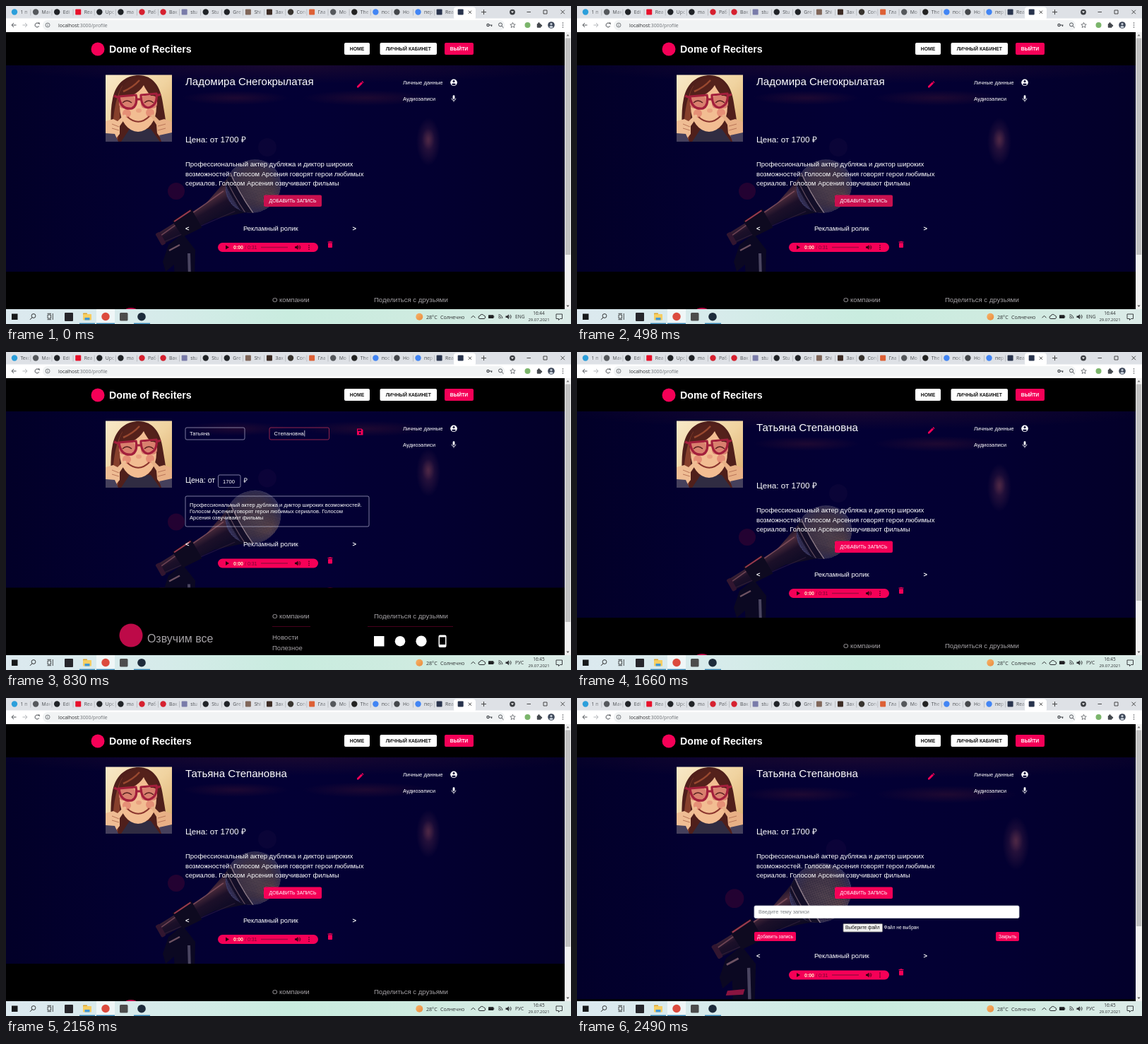
Recreate the animation shown at these times as an HTML page with a canvas. Size 800 by 450 pixels, loop 3.32 s.

```html
<!DOCTYPE html>
<html lang="ru">
<head>
<meta charset="utf-8">
<style>
  html, body { margin: 0; width: 800px; height: 450px; overflow: hidden; background: #000; }
  canvas { display: block; }
</style>
</head>
<body>
<canvas id="stage" width="800" height="450"></canvas>
<script>
const ctx = document.getElementById('stage').getContext('2d');
const SANS = '"Liberation Sans", Arial, sans-serif';
const UI = '"Open Sans", "Noto Sans", sans-serif';
const PINK = '#f50057', WHITE = '#fff', GREY = '#a5a2a6', DARK = '#2b2d30';
const STEP = 830;

// shift: vertical offset of everything below the description
const scenes = [
  { name: 'Ладомира Снегокрылатая', tab: '1 п', lang: 'ENG', time: '16:44', shift: 0, thumb: 352, mid: 230, zoom: 1, add: '#c9104f' },
  { edit: true, tab: 'Текс', lang: 'РУС', time: '16:45', shift: -42.5, thumb: 382, mid: 208.5, zoom: 1 },
  { name: 'Татьяна Степановна', tab: '1 п', lang: 'РУС', time: '16:45', shift: 0, thumb: 352, mid: 230, zoom: 1, add: PINK },
  { name: 'Татьяна Степановна', tab: '1 п', lang: 'РУС', time: '16:45', shift: 50.5, thumb: 323, mid: 248, zoom: 1.116, add: PINK, form: true }
];

function box(x, y, w, h, fill, r = 0, stroke) {
  ctx.beginPath();
  ctx.roundRect(x, y, w, h, r);
  if (fill) { ctx.fillStyle = fill; ctx.fill(); }
  if (stroke) { ctx.strokeStyle = stroke; ctx.lineWidth = 0.8; ctx.stroke(); }
}
function disc(x, y, r, fill, ry = r) {
  ctx.beginPath();
  ctx.ellipse(x, y, r, ry, 0, 0, 7);
  ctx.fillStyle = fill;
  ctx.fill();
}
function ring(x, y, r, color, width = 1, from = 0, to = Math.PI * 2) {
  ctx.beginPath();
  ctx.arc(x, y, r, from, to);
  ctx.strokeStyle = color;
  ctx.lineWidth = width;
  ctx.stroke();
}
function line(points, color, width = 1) {
  ctx.strokeStyle = color;
  ctx.lineWidth = width;
  ctx.stroke(new Path2D('M' + points));
}
function shape(d, fill) {
  ctx.fillStyle = fill;
  ctx.fill(new Path2D(d));
}
function text(s, x, y, size, color = WHITE, { bold, align = 'left', font = SANS } = {}) {
  ctx.font = `${bold ? 'bold ' : ''}${size}px ${font}`;
  ctx.textAlign = align;
  ctx.fillStyle = color;
  ctx.fillText(s, x, y);
}
function button(label, x, y, w, h, fill, color, size, bold) {
  box(x, y, w, h, fill, 2);
  text(label, x + w / 2, y + h / 2 + size * 0.36, size, color, { bold, align: 'center' });
}
function clipped(x, y, w, h, draw) {
  ctx.save();
  ctx.beginPath();
  ctx.rect(x, y, w, h);
  ctx.clip();
  draw();
  ctx.restore();
}
function glow(x, y, rx, ry, rgb, alpha) {
  ctx.save();
  ctx.translate(x, y);
  ctx.scale(rx, ry);
  const g = ctx.createRadialGradient(0, 0, 0, 0, 0, 1);
  g.addColorStop(0, `rgba(${rgb},${alpha})`);
  g.addColorStop(1, `rgba(${rgb},0)`);
  ctx.fillStyle = g;
  ctx.fillRect(-1, -1, 2, 2);
  ctx.restore();
}
function blend(x0, y0, x1, y1, ...colors) {
  const g = ctx.createLinearGradient(x0, y0, x1, y1);
  colors.forEach((c, i) => g.addColorStop(i / (colors.length - 1), c));
  return g;
}

function drawMicrophone() {
  shape('M230 338L250 322L268 345L266 420L240 420L238 366L226 376L222 362Z', '#0b0822');
  line('259 350L261 420', '#4a4560', 4);
  line('231 346L246 338', '#6d5262', 2.5);
  shape('M232 379L254 377L252 384L230 385Z', '#8a1440');

  ctx.save();
  ctx.translate(350, 255);
  ctx.rotate(Math.PI * 0.835);
  shape('M20 -30L36 -24L70 -13L152 -8L154 9L70 12L36 24L20 31Z',
    blend(0, -26, 0, 28, '#0d0a22', '#120c26', '#1c1029', '#4b2b3b', '#160e27'));
  line('40 15L150 4', 'rgba(165,105,115,.55)', 1.6);
  line('40 -18L148 -6', 'rgba(95,60,90,.35)', 1);
  shape('M92 -15L122 -13L124 14L92 16Z', '#0e0a20');
  line('94 14L122 12', '#9a3a4e', 2);
  box(147, -9, 7, 19, '#321630', 2);

  ctx.beginPath();
  ctx.ellipse(0, 0, 40, 37, 0, 0, 7);
  ctx.clip();
  const mesh = ctx.createRadialGradient(-4, -6, 4, 0, 0, 41);
  mesh.addColorStop(0, '#6f5d62');
  mesh.addColorStop(0.55, '#5a4a58');
  mesh.addColorStop(0.88, '#454068');
  mesh.addColorStop(1, '#5b5b92');
  ctx.fillStyle = mesh;
  ctx.fillRect(-42, -40, 84, 80);
  glow(-14, -26, 26, 18, '165,120,95', 0.5);
  for (let k = -80; k <= 80; k += 3) {
    line(`${k - 40} -40L${k + 40} 40`, 'rgba(14,10,38,.5)', 0.9);
    line(`${k + 40} -40L${k - 40} 40`, 'rgba(14,10,38,.5)', 0.9);
  }
  line('25 -40Q30 0 25 40', '#130e28', 12);
  line('18 -40Q23 0 18 40', '#8d7c88', 1.2);
  line('27 -40Q32 0 27 40', '#5f4a5c', 1.2);
  ctx.restore();
}

function drawBackdrop({ mid, zoom, shift }) {
  clipped(0, 84, 792, 292 + shift, () => {
    ctx.translate(396, mid);
    ctx.scale(zoom, zoom);
    ctx.translate(-396, -230);
    ctx.fillStyle = blend(0, 0, 792, 0, '#020028', '#030031', '#030035', '#030031', '#030029');
    ctx.fillRect(0, 40, 792, 400);
    glow(400, 84, 420, 26, '50,18,42', 0.45);
    glow(325, 130, 75, 10, '70,22,48', 0.4);
    glow(510, 130, 90, 11, '70,22,48', 0.4);
    glow(598, 192, 17, 34, '95,45,75', 0.55);
    glow(598, 188, 9, 15, '120,65,80', 0.4);
    disc(370, 200, 13, 'rgba(60,25,80,.14)');
    disc(241, 262, 12, 'rgba(120,8,50,.28)');
    drawMicrophone();
  });
}

function drawPortrait() {
  clipped(141, 97.5, 94, 94.5, () => {
    ctx.fillStyle = blend(141, 97, 235, 192, '#f8e9c8', '#f0d3a0', '#d8a766');
    ctx.fillRect(141, 97, 94, 95);
    shape('M145 192C151 174 146 154 151 131C156 107 172 98 188 98C208 98 219 114 222 137C225 157 230 174 224 192Z', '#4f1f1b');
    shape('M151 184C151 160 154 130 165 112C159 140 163 168 158 190Z', '#87402c');
    shape('M163 192L175 174H205L218 192Z', '#302c42');
    disc(187, 143, 26, '#f2bd92', 35);
    shape('M159 135C159 109 178 100 193 102C210 104 216 120 216 136C207 131 199 121 195 112C188 124 173 130 159 135Z', '#54211b');
    line('166 121Q180 115 189 105', '#98482f', 2.5);
    disc(171, 152, 6, '#e58f76');
    disc(204, 151, 6, '#e58f76');
    ctx.save();
    ctx.lineJoin = 'round';
    for (const x of [160, 191]) {
      box(x, 127, 23, 18, '#d9806e', 6);
      line(`${x + 5} 137Q${x + 11} 131 ${x + 18} 137`, '#5a2320', 1.6);
    }
    line('160 128L184 126Q187 141 178 145Q162 147 160 128ZM191 126L213 124Q215 141 201 144Q191 142 191 126ZM184 132L191 132M153 127L160 130M213 127L219 125', '#a31f3c', 3.2);
    ctx.restore();
    disc(188, 148, 4, '#e9a180', 3);
    line('172 157Q188 171 203 156', '#8a342d', 2);
    // hands with fingers pressed to the cheeks
    shape('M141 163L152 160L158 163L167 154Q171 153 170 157L161 170L161 181L152 192H141Z', '#efbd94');
    shape('M235 164L224 160L217 162L209 154Q204 153 206 157L213 168L214 180L223 192H235Z', '#e8b086');
    line('150 167L160 171M150 173L160 176M226 167L215 170M226 173L215 176', '#b97558', 1);
    shape('M141 180L154 181L159 192H141ZM217 183L235 179V192H220Z', '#45405c');
  });
}

function drawSpeaker(x, y, color) {
  shape(`M${x - 4} ${y - 1.3}h2l2.4 -2.2v7l-2.4 -2.2h-2Z`, color);
  ring(x, y, 2, color, 0.8, -1, 1);
  ring(x, y, 3.8, color, 0.8, -0.9, 0.9);
}

function drawPlayer(shift) {
  ctx.save();
  ctx.translate(0, shift);
  text('<', 254, 317.5, 9.4, WHITE, { bold: true });
  text('Рекламный ролик', 336, 317.5, 9.43);
  text('>', 490.5, 317.5, 9.4, WHITE, { bold: true });
  box(300, 335, 142, 13, PINK, 6.5);
  shape('M311 338.5L316 341.5L311 344.5Z', '#30000f');
  text('0:00', 322, 344, 7, '#fff3c8', { bold: true });
  text('/ 0:31', 338, 344, 7, '#780530');
  line('361 341.5L399 341.5', '#a50842', 1.6);
  drawSpeaker(413, 341.5, '#30000f');
  for (const y of [338.8, 341.5, 344.2]) disc(429, y, 0.8, '#30000f');
  box(455.5, 333.5, 7, 1.1, PINK);
  box(457.5, 332.8, 3, 1, PINK);
  box(456, 335.3, 6, 6.7, PINK, 0.8);
  ctx.restore();
}

function drawHeader() {
  box(0, 37, 792, 47, '#000');
  disc(130, 61, 9.5, PINK);
  text('Dome of Reciters', 146, 66, 14.2, WHITE, { bold: true });
  button('HOME', 479, 52, 36, 17, WHITE, '#111', 6.8, true);
  button('ЛИЧНЫЙ КАБИНЕТ', 529.5, 52, 80.5, 17, WHITE, '#111', 6.7, true);
  button('ВЫЙТИ', 621, 52, 41, 17, PINK, WHITE, 6.8, true);
}

function drawMenu() {
  text('Личные данные', 562, 111, 7.7);
  text('Аудиозаписи', 562, 133.5, 7.7);
  disc(634, 108.3, 4.8, WHITE);
  disc(634, 106.6, 1.5, '#040034');
  disc(634, 110.8, 2.8, '#040034', 1.4);
  box(632.6, 126.3, 2.8, 5.5, WHITE, 1.4);
  ring(634, 130.6, 2.9, WHITE, 0.8, 0, Math.PI);
  line('634 133.4L634 135.6', WHITE, 0.9);
}

function drawDetails({ name, add }) {
  text(name, 254, 112, 15.03);
  shape('M497 113.5L503 107.5L505 109.5L499 115.5H497ZM503.6 106.9L504.6 106L506.5 107.9L505.6 108.9Z', PINK);
  text('Цена: от 1700 ₽', 254, 193, 11.72);
  ['Профессиональный актер дубляжа и диктор широких',
    'возможностей. Голосом Арсения говорят герои любимых',
    'сериалов. Голосом Арсения озвучивают фильмы'
  ].forEach((s, i) => text(s, 254, 226.8 + i * 13.7, 9.5));
  button('ДОБАВИТЬ ЗАПИСЬ', 365, 267.5, 82, 16.5, add, WHITE, 6.85);
}

function drawEditor() {
  const border = 'rgba(205,205,230,.75)';
  box(254, 107, 84, 17, null, 2, border);
  text('Татьяна', 260, 118, 7.6);
  box(373, 107, 84.5, 17, null, 2, '#b52f55');
  text('Степановна', 379.5, 118, 7.6);
  box(422.5, 111, 0.7, 8.5, WHITE);
  shape('M497 108.5H503.5L505.5 110.5V117.5H497Z', PINK);
  box(498.2, 109.6, 4.8, 2.2, '#0a0030');
  disc(501.2, 114.8, 1.4, '#0a0030');
  text('Цена: от', 254, 185, 10.7);
  box(300.5, 174, 31.5, 17.5, null, 2, border);
  text('1700', 307, 185.5, 7.6);
  text('₽', 336.5, 185, 9.4);
  box(254, 204, 260, 43, null, 2, border);
  ['Профессиональный актер дубляжа и диктор широких возможностей.',
    'Голосом Арсения говорят герои любимых сериалов. Голосом',
    'Арсения озвучивают фильмы'
  ].forEach((s, i) => text(s, 260, 219.3 + i * 8.8, 7.6));
}

function drawForm() {
  box(251, 294, 375, 17.5, WHITE, 2, '#ced4da');
  text('Введите тему записи', 257, 305.3, 7.35, '#7d8186');
  box(377, 319.5, 55.5, 11.5, '#efefef', 1, '#767676');
  text('Выберите файл', 380, 327.4, 6.55, '#111');
  text('Файл не выбран', 434.5, 327.4, 6.5);
  button('Добавить запись', 251, 331, 59, 13, PINK, WHITE, 6.5);
  button('Закрыть', 593, 331, 33, 13, PINK, WHITE, 6.5);
}

function drawFooter(shift) {
  ctx.save();
  ctx.translate(0, shift);
  box(0, 376, 792, 180, '#000');
  text('О компании', 377, 419, 9.55, GREY);
  text('Поделиться с друзьями', 521, 419, 9.55, GREY);
  box(377, 430.6, 54, 0.9, '#47001c');
  box(512, 430.6, 121, 0.9, '#47001c');
  disc(177, 443.5, 16.5, '#bd0a48');
  text('Озвучим все', 200, 453.5, 15.9, GREY);
  text('Новости', 377, 449.5, 9.52, GREY);
  text('Полезное', 377, 464.8, 9.52, GREY);
  box(521, 444.5, 14.5, 14.5, WHITE);
  disc(558, 451.7, 7.3, WHITE);
  disc(588, 451.7, 7.6, WHITE);
  box(612.5, 443, 11, 17.5, WHITE, 2);
  box(614, 446, 8, 10.5, '#000');
  ctx.restore();
}

function drawScrollbar(end) {
  box(791, 37, 9, 392, '#f1f1f1');
  box(791.8, 45.5, 7.4, end - 45.5, '#c1c1c1');
  shape('M793.5 42.5L795.5 40L797.5 42.5Z', '#777');
  shape('M793.5 423.5L795.5 426L797.5 423.5Z', '#505050');
}

const tabs = [
  ['', '#2c9fdb'], ['Мак', '#55585c'], ['Edi', '#202327'], ['Rea', '#e8102a', 1], ['Upc', '#202327'], ['ma', '#202327'],
  ['Раб', '#d6202f'], ['Вак', '#d6202f'], ['stu', '#797ba9', 1], ['Stu', '#202327'], ['Gre', '#202327'], ['Shi', '#80675a', 1],
  ['Зах', '#3c2b24', 1], ['Con', '#38342f'], ['Гла', '#dd6035', 1], ['Мо', '#55585c'], ['The', '#222'], ['пос', '#4285f4'],
  ['Но', '#44474b'], ['пер', '#4285f4'], ['Rea', '#29344d', 1], ['', '#29344d', 1]
];

function drawBrowser(firstTab) {
  box(0, 0, 800, 37, WHITE);
  box(0, 0, 800, 17.5, '#dee1e6');
  box(634, 1.5, 31, 18, WHITE, 4);
  tabs.forEach(([label, color, square], i) => {
    const x = 12 + i * 30.08;
    if (square) box(x - 4, 4.5, 8, 8, color, 1);
    else disc(x, 8.5, 4.2, color);
    if (i && i < 21) box(x - 7.5, 4.5, 0.6, 9, '#a2a6ab');
    clipped(x + 7, 2, 14, 14, () =>
      text(i ? label : firstTab, x + 8.5, 11.2, 6.8, blend(x + 12, 0, x + 22, 0, '#45484c', '#b7babf'), { font: UI }));
  });
  line('654.8 6.6L659 10.8M659 6.6L654.8 10.8', '#333', 0.9);
  line('673 8.6L680 8.6M676.5 5.1L676.5 12.1', '#444', 1);
  disc(717, 8.6, 3.9, '#3b3e42');
  shape('M715 7.5H719L717 10Z', WHITE);
  line('737.5 8.5L743 8.5', '#222', 0.8);
  box(761, 6, 5, 5, null, 0, '#222');
  line('785.5 5.7L791 11.2M791 5.7L785.5 11.2', '#222', 0.8);

  box(52, 20, 654, 14.5, '#f1f3f4', 7);
  line('14.5 27L8 27M11 24L8 27L11 30', '#505459', 1);
  line('23.5 27L30 27M27 24L30 27L27 30', '#b2b5b9', 1);
  ring(44, 27, 3, '#505459', 1, 0.4, 5.5);
  shape('M44.8 23.6H47.6V26.5Z', '#505459');
  ring(59, 27, 3, '#5f6368', 0.8);
  box(58.6, 26.4, 0.8, 2.4, '#5f6368');
  box(58.6, 25, 0.8, 0.8, '#5f6368');
  text('localhost', 74, 29.6, 6.9, DARK, { font: UI });
  const width = ctx.measureText('localhost').width;
  text(':3000/profile', 74 + width, 29.6, 6.9, '#6b6f74', { font: UI });
  ring(682.5, 27, 1.6, '#44484d', 1.2);
  line('684 27L688.5 27M687.5 27L687.5 29', '#44484d', 1.2);
  ring(700, 26.4, 2.5, '#55595e', 1);
  line('702 28.4L704.5 30.8', '#55595e', 1);
  line('717.5 23.4L718.6 25.9L721.2 26.1L719.2 27.9L719.8 30.5L717.5 29.1L715.2 30.5L715.8 27.9L713.8 26.1L716.4 25.9Z', '#55595e', 0.8);
  disc(738.5, 27, 4, '#7bb56b');
  box(751.8, 25, 5.7, 5.7, '#44484d', 0.8);
  disc(754.5, 24.7, 1.4, '#44484d');
  disc(757.8, 27.8, 1.4, '#44484d');
  disc(772, 27, 4.8, '#3c4657');
  disc(772, 25.5, 1.6, '#c8d0da');
  disc(772, 29.4, 2.7, '#c8d0da', 1.5);
  for (const y of [24, 27, 30]) disc(788.5, y, 0.8, '#505459');
}

function drawTaskbar({ lang, time }) {
  box(0, 429, 800, 21, blend(0, 0, 800, 0, '#dce9ef', '#d7ebeb', '#c9ecdf', '#cfebe0', '#dcebe8'));
  box(128, 429, 26, 21, 'rgba(255,255,255,.6)');
  box(8, 435.5, 8.5, 8.5, '#17191b');
  ring(39, 438.5, 2.9, '#222', 0.9);
  line('37 440.8L34 443.8', '#222', 1);
  box(59, 437, 4.5, 5, null, 0, '#222');
  line('58.5 435.3L64 435.3M58.5 443.7L64 443.7M66.3 435L66.3 444', '#222', 0.8);
  box(83, 434, 12, 12, '#26262b', 1);
  box(109, 434.5, 6, 4, '#dba42f', 0.7);
  box(109, 436, 12, 8.5, '#f7ce62', 0.7);
  box(111.5, 441, 7, 3.5, '#4298d5');
  disc(141, 439.5, 5.7, '#dc4b3e');
  box(161, 434, 11.5, 11.5, '#4c4c4c', 1.5);
  disc(192, 439.7, 5.8, '#1d2b3b');
  for (const [x, w] of [[104, 22], [128, 26], [181, 23]]) box(x, 448.6, w, 1.4, '#3887b5');

  const ui = { font: UI }, centered = { font: UI, align: 'center' };
  disc(585.3, 439.8, 5, blend(581, 435, 590, 445, '#f6b268', '#e98b3c'));
  text('28°C', 595, 442.6, 7.1, DARK, ui);
  text('Солнечно', 615, 442.6, 7.1, DARK, ui);
  line('658.5 441.3L661.5 438.3L664.5 441.3', DARK, 1);
  ctx.lineWidth = 1;
  ctx.stroke(new Path2D('M671 442.5a2 2 0 0 1 0-4a3 3 0 0 1 5.5-.5a2.3 2.3 0 0 1 .5 4.5Z'));
  box(683, 437.3, 7.3, 4.8, '#1e2022', 0.6);
  box(690.3, 438.6, 0.9, 2.2, '#1e2022');
  for (const r of [2, 4, 6]) ring(697, 442.7, r, DARK, 0.9, -1.5, -0.1);
  drawSpeaker(711.5, 439.7, DARK);
  text(lang, 721, 442.3, 6.6, DARK, ui);
  text(time, 754.5, 437.3, 6.4, DARK, centered);
  text('29.07.2021', 754.5, 446.3, 5.9, DARK, centered);
  ctx.strokeStyle = DARK;
  ctx.lineWidth = 0.9;
  ctx.stroke(new Path2D('M779 436H787.5V442.5H784.5L782.5 444.5V442.5H779Z'));
}

function drawScene(scene) {
  drawHeader();
  drawBackdrop(scene);
  drawFooter(scene.shift);
  drawPortrait();
  drawMenu();
  if (scene.edit) drawEditor();
  else drawDetails(scene);
  if (scene.form) drawForm();
  drawPlayer(scene.shift);
  drawScrollbar(scene.thumb);
  drawBrowser(scene.tab);
  drawTaskbar(scene);
}

const start = performance.now();
let shown = -1;
function tick() {
  const index = Math.floor((performance.now() - start) / STEP) % scenes.length;
  if (index !== shown) drawScene(scenes[shown = index]);
  requestAnimationFrame(tick);
}
tick();
</script>
</body>
</html>
```
